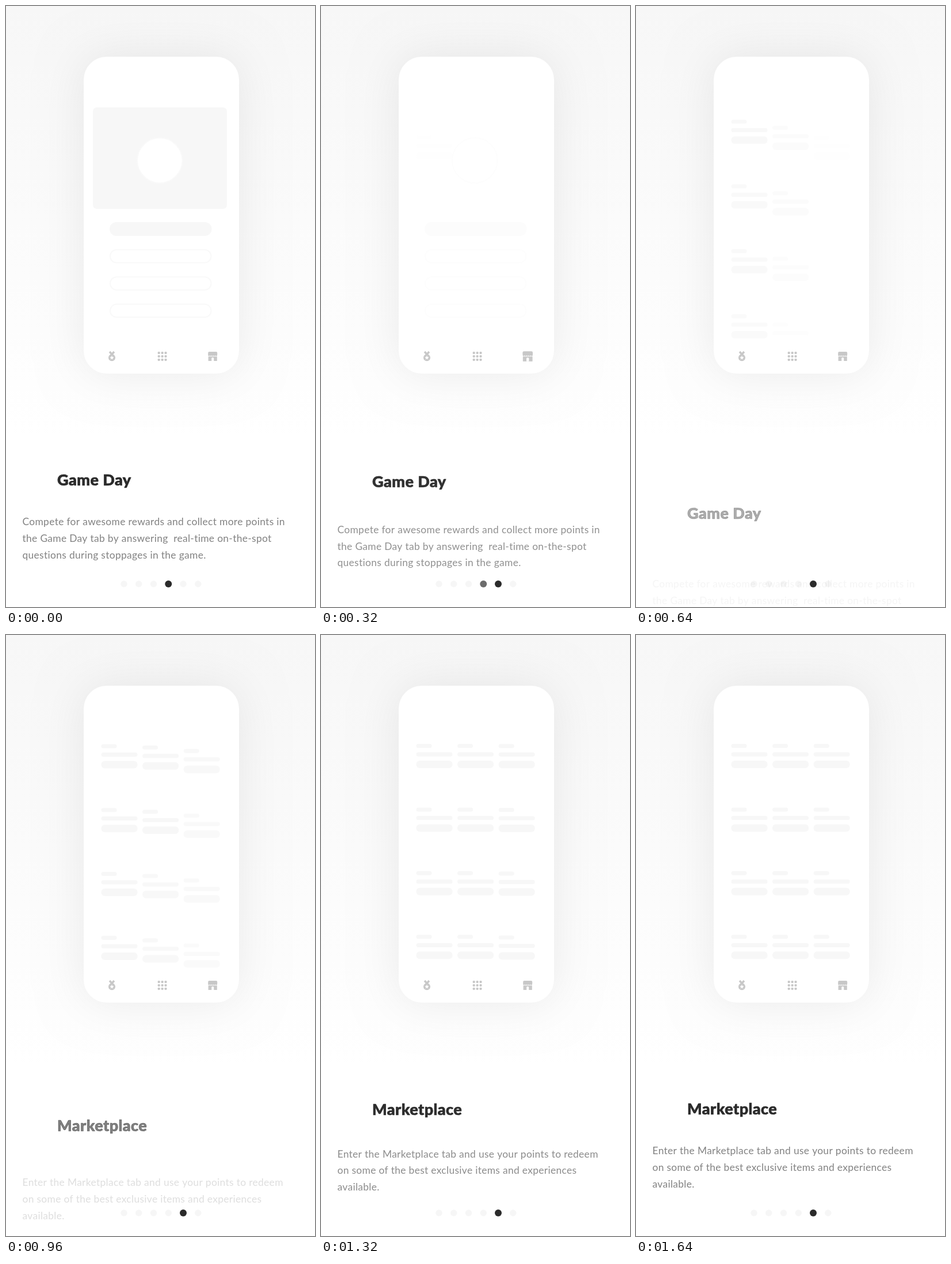
Animation of 537 by 1043 pixels, one loop 3.68 s. Source, as an HTML page with a canvas:

```html
<!DOCTYPE html>
<html lang="en">
<head>
<meta charset="utf-8">
<title>Onboarding: Marketplace</title>
<style>
  html, body { margin: 0; width: 100%; height: 100%; overflow: hidden; background: #fff; }
  canvas { display: block; width: 537px; height: 1043px; }
</style>
</head>
<body>
<canvas id="stage"></canvas>
<script>
const W = 537, H = 1043, LOOP = 3680, STEP = 40;
const canvas = document.getElementById('stage');
const ratio = window.devicePixelRatio || 1;
canvas.width = W * ratio;
canvas.height = H * ratio;
const ctx = canvas.getContext('2d');
ctx.scale(ratio, ratio);

const INK = '#2b2b2b', ICON = '#c8c8c8', SOFT = '#f7f7f7';
const TITLE = { font: '800 27px Lato, sans-serif', tracking: '0.45px', color: INK, outline: 0.7 };
const BODY = { font: '400 17.4px Lato, sans-serif', tracking: '0.33px', color: '#828282' };

const pages = [
  { title: 'Game Day', lines: [
    'Compete for awesome rewards and collect more points in',
    'the Game Day tab by answering  real-time on-the-spot',
    'questions during stoppages in the game.'] },
  { title: 'Marketplace', lines: [
    'Enter the Marketplace tab and use your points to redeem',
    'on some of the best exclusive items and experiences',
    'available.'] }
];

const progress = (t, start, end) => Math.min(1, Math.max(0, (t - start) / (end - start)));
const cubicIn = p => p ** 3;
const cubicLeft = p => (1 - p) ** 3;

function withAlpha(alpha, draw) {
  if (alpha <= 0) return;
  ctx.save();
  ctx.globalAlpha = alpha;
  draw();
  ctx.restore();
}

function roundRect(x, y, w, h, r, fill) {
  ctx.beginPath();
  ctx.roundRect(x, y, w, h, r);
  if (fill) {
    ctx.fillStyle = fill;
    ctx.fill();
  }
}

function disc(x, y, r, fill) {
  ctx.beginPath();
  ctx.arc(x, y, r, 0, Math.PI * 2);
  ctx.fillStyle = fill;
  ctx.fill();
}

function drawBackdrop() {
  const sky = ctx.createLinearGradient(0, 0, 0, 750);
  sky.addColorStop(0, 'rgb(247,247,247)');
  sky.addColorStop(1, '#fff');
  ctx.fillStyle = sky;
  ctx.fillRect(0, 0, W, H);
  ctx.save();
  ctx.shadowColor = 'rgba(0,0,0,0.075)';
  ctx.shadowBlur = 78 * ratio;
  roundRect(135, 88, 270, 550, 40, '#fff');
  ctx.restore();
}

// Three columns of placeholder items rise into place, staggered by column and row.
function drawItems(t) {
  ctx.save();
  ctx.beginPath();
  ctx.rect(135, 88, 270, 489.5);
  ctx.clip();
  for (let col = 0; col < 3; col++) {
    for (let row = 0; row < 4; row++) {
      const start = 269 + col * 163 + row * 36;
      const left = cubicLeft(progress(t, start, start + 891));
      const x = 165.5 + col * 71.6;
      const y = 189 + row * 110.4 + left * 42;
      withAlpha(1 - left, () => {
        roundRect(x, y, 27, 7, 3.5, SOFT);
        roundRect(x, y + 14.5, 63, 7.2, 3.6, SOFT);
        roundRect(x, y + 29, 63, 13, 6, SOFT);
      });
    }
  }
  ctx.restore();
}

function drawQuiz(t) {
  const fade = 1 - progress(t, 0, 540);
  withAlpha(1 - progress(t, 0, 330), () => roundRect(151, 176, 233, 176, 7, SOFT));
  withAlpha(fade, () => {
    disc(267.3, 268, 39.3, '#fff');
    ctx.lineWidth = 2;
    ctx.strokeStyle = '#f9f9f9';
    ctx.stroke();
    roundRect(180, 375, 177.5, 24, 12, SOFT);
    for (let i = 0; i < 3; i++) {
      roundRect(181, 423 + i * 47.3, 175.5, 22.5, 11.2);
      ctx.stroke();
    }
  });
}

function drawMedal(x, y) {
  ctx.strokeStyle = ICON;
  ctx.lineWidth = 3.4;
  ctx.beginPath();
  ctx.moveTo(x - 4, y - 8);
  ctx.lineTo(x + 1.5, y - 2);
  ctx.moveTo(x + 4, y - 8);
  ctx.lineTo(x - 1.5, y - 2);
  ctx.stroke();
  disc(x, y + 2.2, 6, ICON);
  ctx.beginPath();
  for (let i = 0; i < 10; i++) {
    const angle = i * Math.PI / 5 - Math.PI / 2;
    const r = i % 2 ? 1.7 : 4;
    ctx.lineTo(x + r * Math.cos(angle), y + 2.4 + r * Math.sin(angle));
  }
  ctx.fillStyle = '#fff';
  ctx.fill();
}

function drawGrid(x, y) {
  for (let i = 0; i < 9; i++) {
    roundRect(x - 7.9 + (i % 3) * 5.9, y - 7.9 + Math.floor(i / 3) * 5.9, 4, 4, 1.4, ICON);
  }
}

function drawShop(x, y, scale) {
  ctx.save();
  ctx.translate(x, y);
  ctx.scale(scale, scale);
  roundRect(-8, -8, 16, 6.2, [2, 2, 1, 1], ICON);
  for (let i = 0; i < 5; i++) disc(-6.4 + i * 3.2, -1.7, 1.3, ICON);
  roundRect(-7.6, 0.2, 15.2, 7.8, 0.5, ICON);
  roundRect(-2, 2, 4, 6, [1.5, 1.5, 0, 0], '#fff');
  ctx.restore();
}

function drawNav(t) {
  drawMedal(184, 608);
  drawGrid(271.6, 608);
  drawShop(359.2, 608, 1 + 0.1 * Math.sin(Math.PI * progress(t, 100, 560)));
}

function drawText(text, x, y, style) {
  ctx.font = style.font;
  ctx.letterSpacing = style.tracking;
  ctx.fillStyle = style.color;
  ctx.fillText(text, x, y);
  if (style.outline) {
    ctx.lineWidth = style.outline;
    ctx.lineJoin = 'round';
    ctx.strokeStyle = style.color;
    ctx.strokeText(text, x, y);
  }
}

function drawCopy(page, titleMove, titleTravel, bodyMove, bodyTravel) {
  withAlpha(1 - titleMove, () =>
    drawText(page.title, 89, 832 + titleMove * titleTravel, TITLE));
  withAlpha(1 - bodyMove, () => page.lines.forEach((line, i) =>
    drawText(line, 28.5, 901.3 + i * 28.7 + bodyMove * bodyTravel, BODY)));
}

function drawDots(t) {
  for (let i = 0; i < 6; i++) {
    const x = 205 + i * 25.75;
    disc(x, 1003, 5.8, 'rgba(0,0,0,0.035)');
    const active = i === 3 ? 1 - progress(t, 240, 490) : i === 4 ? progress(t, 40, 300) : 0;
    withAlpha(active, () => disc(x, 1003, 6, INK));
  }
}

function render(t) {
  drawBackdrop();
  drawItems(t);
  drawQuiz(t);
  drawNav(t);
  drawCopy(pages[0],
    cubicIn(progress(t, 130, 731)), 95,
    cubicIn(progress(t, 0, 659)), 118);
  drawCopy(pages[1],
    cubicLeft(progress(t, 773, 1490)), 72,
    cubicLeft(progress(t, 887, 1630)), 75);
  drawDots(t);
}

function tick() {
  const t = performance.now() % LOOP;
  render(Math.floor(t / STEP) * STEP);
  requestAnimationFrame(tick);
}
tick();
</script>
</body>
</html>
```
